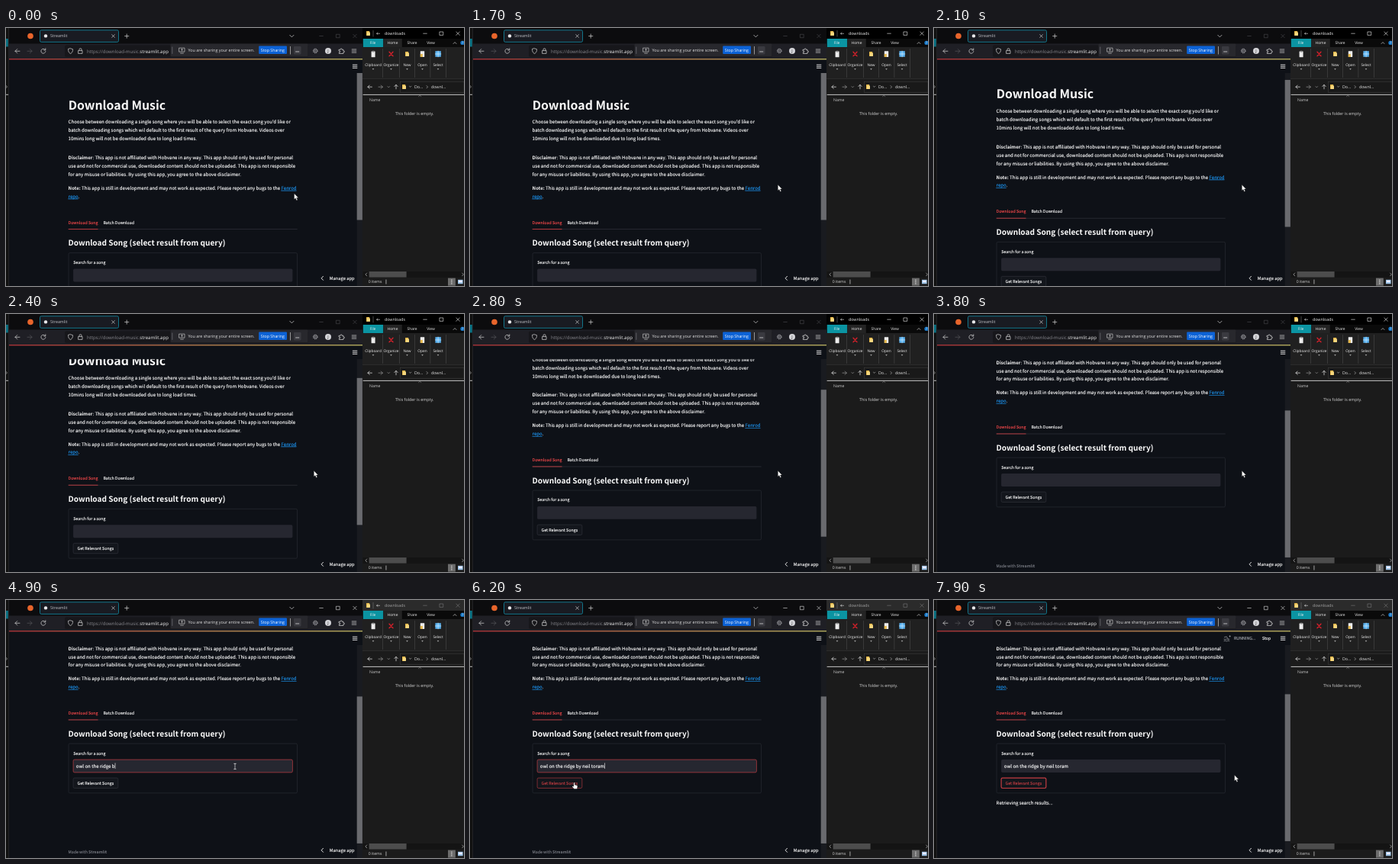
Animation of 600 by 338 pixels, one loop 8 s. Source, as an HTML page:

```html
<!DOCTYPE html>
<html lang="en">
<head>
<meta charset="utf-8">
<title>Download Music</title>
<style>
  html, body { margin: 0; width: 100%; height: 100%; overflow: hidden; background: #0c0c0e; }
  svg { display: block; width: 100vw; height: 100vh; }
  text { white-space: pre; text-rendering: geometricPrecision; }
  .app { --ink: #fafafa; font-family: "Noto Sans CJK JP", "Noto Sans CJK SC", "Noto Sans CJK", Lato, sans-serif; }
  .app, .app tspan { fill: var(--ink); stroke: var(--ink); stroke-width: .14; }
  .ui { font-family: "Open Sans", "Noto Sans", sans-serif; }
  .app.b, .app .b { font-weight: 700; stroke-width: 0; }
  .link { --ink: #1c8fe8; text-decoration: underline; }
  .line { fill: none; stroke-linecap: round; stroke-linejoin: round; }
</style>
</head>
<body>
<svg id="stage" viewBox="0 0 600 338" preserveAspectRatio="none"></svg>
<script>
const LOOP = 8000;
const RED = '#f4494b', RED_EDGE = '#c23d42';
const SONG = 'owl on the ridge by neil toram';

const text = (x, y, size, str, cls = 'app', extra = '') =>
  `<text x="${x}" y="${y}" font-size="${size}" class="${cls}" ${extra}>${str}</text>`;
const ui = (x, y, size, str, fill = '#e4e4e4', extra = '') =>
  text(x, y, size, str, 'ui', `fill="${fill}" ${extra}`);
const mid = (x, y, size, str, fill) => ui(x, y, size, str, fill, 'text-anchor="middle"');
const rect = (x, y, w, h, fill, extra = '') =>
  `<rect x="${x}" y="${y}" width="${w}" height="${h}" fill="${fill}" ${extra}/>`;
const path = (d, stroke = '#d8d8d8', w = 0.7, extra = '') =>
  `<path class="line" d="${d}" stroke="${stroke}" stroke-width="${w}" ${extra}/>`;
const dot = (x, y, r, fill, extra = '') =>
  `<circle cx="${x}" cy="${y}" r="${r}" fill="${fill}" ${extra}/>`;
const ink = color => `style="--ink:${color}"`;
const bold = s => `<tspan class="b">${s}</tspan>`;
const link = s => `<tspan class="link">${s}</tspan>`;
const winButtons = (xs, y) => path(
  `M${xs[0] - 2.3} ${y}h4.6M${xs[1] - 2.2} ${y - 2.2}h4.4v4.4h-4.4z` +
  `M${xs[2] - 2.2} ${y - 2.2}l4.4 4.4m0-4.4l-4.4 4.4`, 'currentColor', 0.6);

function leftEdge() {
  return rect(0, 0, 4, 338, '#111') + rect(0, 14, 2.8, 10.5, '#0b7284') +
    rect(0, 86.8, 3, 0.9, '#cfcfcf') + path('M0 75.5l1.6 1.5l-1.6 1.5', '#ccc', 0.6) +
    rect(3, 0, 0.8, 338, '#29292c');
}

function browserChrome() {
  return rect(3.8, 0, 463.2, 21, '#0c0c0e') + rect(3.8, 20.5, 463.2, 20, '#1f1f25') +
    dot(32, 10.5, 3.8, '#e8652b') +
    rect(44.5, 2.8, 103, 15.6, '#191b22', 'rx="1.8" stroke="#148198" stroke-width=".9"') +
    dot(52, 10.4, 2.2, '#e8e8ea') + ui(58, 12.4, 5.35, 'Streamlit', '#c4c5ca') +
    path('M138.7 8.7l3.6 3.6m0-3.6l-3.6 3.6M158.2 8v5.2m-2.6-2.6h5.2M371.8 9.3l2.6 2.6l2.6-2.6') +
    `<g id="webButtons">${winButtons([413, 435, 457], 10.5)}</g>` +
    path('M18 30.3h-6m2.7-2.7l-2.7 2.7l2.7 2.7') +
    path('M28 30.3h6m-2.7-2.7l2.7 2.7l-2.7 2.7', '#55555b') +
    path('M51.4 28.6a3 3 0 1 0 .5 2M51.8 26.8v2.2h-2.2') +
    rect(77, 22.5, 319, 15.5, '#17171b', 'rx="2"') +
    path('M84.5 26.8l3 1c0 3-.8 4.6-3 5.8c-2.2-1.2-3-2.8-3-5.8z') +
    path('M95 29.6h5v3.8h-5zM96 29.4v-1.2a1.5 1.5 0 0 1 3 0v1.2') +
    ui(106, 32.7, 6.1, 'https://download-music.<tspan fill="#f2f2f2">streamlit.app</tspan>', '#8b8b91') +
    rect(215.5, 20.8, 180, 16.4, '#28282d', 'rx="1"') +
    path('M217.8 25v8.5', '#66666b', 0.9) +
    path('M227 26.2h7v5h-7zM228.6 33.2h3.8M230.5 30v-2.4m-1 .9l1-1l1 1', '#d8d8d8', 0.6) +
    ui(238.5, 30.9, 5.38, 'You are sharing your entire screen.') +
    rect(331.2, 23.4, 36.8, 10.7, '#0c62d6', 'rx="1"') +
    ui(333.8, 30.8, 5.25, 'Stop Sharing', '#fff') +
    rect(372, 24, 0.7, 10.5, '#c8c8c8') + rect(377, 24, 9.5, 10.5, '#3a3a40', 'rx="1"') +
    path('M379.6 31h4.2', '#eee') +
    dot(405.3, 30, 2.9, 'none', 'stroke="#a8a8ac" stroke-width="1" stroke-dasharray="1.2 1.08"') +
    dot(405.3, 30, 2.2, 'none', 'stroke="#b8b8bc" stroke-width=".6"') +
    dot(405.3, 30, 0.9, 'none', 'stroke="#b8b8bc" stroke-width=".5"') +
    dot(422, 30, 4, '#d4d4d8') + mid(422, 32, 5.2, 'J', '#222') +
    path('M436.4 28.3h1.8a1 1 0 1 1 1.9 0h1.8v1.7a1 1 0 1 1 0 1.8v1.7h-5.5v-1.7a1 1 0 1 0 0-1.8z') +
    path('M453.2 28h5.6m-5.6 2.1h5.6m-5.6 2.1h5.6');
}

function pageContent() {
  const body = [
    [125.4, 'Choose between downloading a single song where you will be able to select the exact song you\'d like or'],
    [136.4, 'batch downloading songs which wil default to the first result of the query from Hobvane. Videos over'],
    [147.3, '10mins long will not be downloaded due to long load times.'],
    [172, bold('Disclaimer') + ': This app is not affiliated with Hobvane in any way. This app should only be used for personal'],
    [183, 'use and not for commercial use, downloaded content should not be uploaded. This app is not responsible'],
    [193.9, 'for any misuse or liabilities. By using this app, you agree to the above disclaimer.'],
    [211.8, bold('Note:') + ' This app is still in development and may not work as expected. Please report any bugs to the ' + link('Fenrod')],
    [222.6, link('repo') + '.']
  ];
  return text(81.7, 106.6, 15.85, 'Download Music', 'app b') +
    body.map(([y, s]) => text(81.6, y, 6.08, s)).join('') +
    text(81.5, 256.6, 5.3, 'Download Song', 'app', ink(RED)) +
    text(127.4, 256.6, 5.3, 'Batch Download') +
    rect(81.7, 263.1, 300, 0.8, '#2b2e36') + rect(81.7, 263, 38.8, 0.9, RED_EDGE) +
    text(81.6, 285.3, 10.08, 'Download Song (select result from query)', 'app b') +
    rect(82, 294.6, 299.5, 64.8, 'none', 'rx="1.7" stroke="#2c2f37" stroke-width=".6"') +
    text(88.2, 309, 5.3, 'Search for a song') +
    rect(88.1, 315.6, 287.3, 16.8, '#262730', 'id="input" rx="1.7" stroke-width=".7"') +
    text(91.8, 326.2, 6.08, '<tspan id="typed"></tspan>') +
    rect(0, 320, 0.6, 7.6, '#fafafa', 'id="caret"') +
    rect(88.1, 339.6, 58.7, 13.4, '#13161c', 'id="button" rx="1.7"') +
    text(93.6, 348.2, 5.3, 'Get Relevant Songs', 'app', 'id="label"') +
    text(81.6, 374.2, 6.08, 'Retrieving search results...', 'app', 'id="status"') +
    text(81.5, 438.3, 5.25, 'Made with ' + bold('Streamlit'), 'app', `id="footer" ${ink('#767980')}`);
}

function page() {
  return rect(3.8, 40, 463.2, 298, '#0e1117') +
    `<g clip-path="url(#view)"><g id="content">${pageContent()}</g></g>` +
    rect(459.7, 59, 7.3, 279, '#191b20') + rect(459.7, 59, 7.2, 192.5, '#696a6e', 'id="thumb"') +
    rect(3.8, 40.3, 463.2, 1.1, 'url(#rainbow)') +
    path('M454.3 48.2h5.6m-5.6 2.1h5.6m-5.6 2.1h5.6', '#e8e8e8', 0.9) +
    path('M415.5 325.3l-2.4 2.5l2.4 2.5', '#fafafa', 0.9) + text(423.7, 330, 5.8, 'Manage app') +
    `<g id="running">${path('', '#a5a8ae', 0.7, 'id="runner"')}${dot(387.6, 47.5, 0.9, '#a5a8ae')}` +
    text(393, 52.4, 5.3, 'RUNNING...', 'app', ink('#a5a8ae')) + text(430, 52.4, 5.2, 'Stop') + '</g>';
}

function folderIcon(x, y) {
  return rect(x, y, 4.2, 6, '#e5b84b', 'rx=".5"') + rect(x + 1, y + 1.6, 4, 4.4, '#f6d880', 'rx=".4"');
}

function explorer() {
  const tools = [[481, 'Clipboard'], [504.5, 'Organize'], [525.5, 'New'], [545.5, 'Open'], [566, 'Select']];
  const tabs = [[480.5, 'File'], [506.5, 'Home'], [532, 'Share'], [556.5, 'View']];
  return rect(467, 0, 133, 338, '#1b1b1b') + rect(467, 0, 133, 14, '#000', 'id="folderTitle"') +
    folderIcon(472, 4) + path('M481 3.5v7.5', '#777', 0.6) +
    path('M489.6 7.3h-4m1.4-1.2l-1.4 1.2l1.4 1.2', '#ddd', 0.6) +
    ui(496, 9.3, 5.3, 'downloads', 'currentColor', 'id="folderName"') +
    `<g id="folderButtons">${winButtons([549, 570.5, 592], 7.2)}</g>` +
    rect(467, 14, 133, 11, '#0a0a0a') + rect(467.8, 14, 26.5, 11, '#0b94a2') + rect(494.3, 14, 24.5, 11, '#242424') +
    tabs.map(([x, s]) => mid(x, 21.3, 4.9, s, '#f0f0f0')).join('') +
    path('M586 20.6l2-2l2 2', '#ccc') + dot(598, 19.4, 2.7, '#1677c8') + mid(598, 21.2, 4.6, '?', '#fff') +
    rect(467, 25, 133, 41.5, '#202020') + rect(467, 66.2, 133, 0.7, '#333') +
    [493.2, 515.3, 535.2, 555.6, 576].map(x => rect(x, 27, 0.6, 38, '#4a4a4a')).join('') +
    tools.map(([x, s]) => mid(x, 49.7, 4.8, s, '#f0f0f0') +
      `<path d="M${x - 1.3} 53.2h2.6l-1.3 1.5z" fill="#ccc"/>`).join('') +
    rect(478.6, 30.6, 5, 7.6, '#ececec', 'rx=".5"') + rect(479.8, 29.8, 2.6, 1.8, '#888') +
    path('M502 31.2l5 5.6m0-5.6l-5 5.6', '#d6202a', 1.3) +
    folderIcon(523, 31) + rect(542.8, 30.2, 5.4, 7.8, '#ececec', 'rx=".4"') + rect(542.8, 34, 3, 4, '#e5b84b') +
    rect(562.4, 30.2, 7.4, 7.6, '#5ab2f0') + path('M566.1 30.2v7.6m-3.7-3.8h7.4', '#d7eefc', 0.7) +
    path('M479.4 77.2h-5.4m2.2-2.2l-2.2 2.2l2.2 2.2M511 79.8v-5.4m-2.2 2.2l2.2-2.2l2.2 2.2', '#eee') +
    path('M488 77.2h5.4m-2.2-2.2l2.2 2.2l-2.2 2.2M500 76.6l1.3 1.3l1.3-1.3', '#9a9a9a') +
    rect(516.5, 70.2, 83.5, 14, '#191919', 'stroke="#444" stroke-width=".5"') + folderIcon(519, 74) +
    path('M528.4 76.2l1.2 1.2l1.2-1.2M551 75.6l1.6 1.6l-1.6 1.6', '#ccc', 0.6) +
    ui(535, 79.2, 5.3, 'Do...') + ui(557, 79.2, 5.3, 'downl...') +
    rect(467.6, 86.9, 132.4, 0.9, '#d6d6d6') + path('M540.6 89.6l1.6-1.3l1.6 1.3', '#aaa', 0.5) +
    ui(476, 96.4, 5.2, 'Name', '#c8c8c8') + ui(510, 114, 5.38, 'This folder is empty.', '#d8d8d8') +
    rect(467.6, 319, 132.4, 7.8, '#141414') + rect(475.6, 319, 49, 7.6, '#4d4d4d') +
    path('M472.7 321l-1.8 1.9l1.8 1.9M597.6 321l1.8 1.9l-1.8 1.9', '#bbb') +
    ui(474.7, 334.4, 5.2, '0 items', '#d8d8d8') + rect(497.6, 329.5, 0.7, 6, '#ddd') +
    rect(579, 327.6, 9.8, 10, '#6c6c6c') + path('M583.4 330.3h.8m-.8 2.3h.8m-.8 2.3h.8', '#eee', 0.9) +
    rect(592, 329.8, 6.6, 5.4, '#9cc3e6') + rect(593, 330.7, 4.6, 2.4, '#eef');
}

const stage = document.getElementById('stage');
stage.innerHTML =
  `<defs><clipPath id="view"><rect x="3.8" y="59.3" width="455.4" height="279"/></clipPath>
  <linearGradient id="rainbow"><stop offset="0" stop-color="#d53c42"/><stop offset=".5" stop-color="#e0935a"/>
  <stop offset="1" stop-color="#e2d873"/></linearGradient></defs>` +
  browserChrome() + page() + leftEdge() + explorer() +
  `<g id="pointer">
    <path id="arrow" d="M0 0v7.8l1.8-1.6l1.3 2.9l1.4-.6l-1.3-2.8h2.4z" fill="#fff" stroke="#111" stroke-width=".4"/>
    <path id="hand" d="M-.8 .4q.8-.9 1.5 0v2.7l3 .8q.8.3.6 1.3l-.6 3.3h-4l-2.4-3.1q.3-1.3 1.9-.2z" fill="#fff" stroke="#111" stroke-width=".4"/>
    <path id="beam" class="line" d="M-1.3-3.6h2.6m-1.3 0v7.2m-1.3 0h2.6" stroke="#fff" stroke-width=".6"/>
  </g>`;

const el = Object.fromEntries([...stage.querySelectorAll('[id]')].map(n => [n.id, n]));
const show = (node, on) => node.setAttribute('visibility', on ? 'visible' : 'hidden');
const smooth = p => p * p * (3 - 2 * p);

// Keys are [time, value, value...]; values hold before the first and after the last.
function at(keys, t, ease = p => p) {
  const i = keys.findIndex(k => k[0] > t);
  if (i === 0) return keys[0].slice(1);
  if (i < 0) return keys[keys.length - 1].slice(1);
  const a = keys[i - 1], b = keys[i], p = ease((t - a[0]) / (b[0] - a[0]));
  return a.slice(1).map((v, n) => v + (b[n + 1] - v) * p);
}

const scrollKeys = [[1930, 0], [2400, 39.2], [3000, 75.6], [3700, 106.5]];
const typeKeys = [[4550, 0], [5000, 24], [5250, 24], [5420, 30]];
const pointerKeys = [
  [100, 377.5, 216.8], [900, 379, 218], [1650, 403.3, 205.3], [4150, 403.3, 205.3],
  [4450, 300, 218], [5650, 300, 218], [6150, 136.6, 239], [6600, 136.6, 239],
  [7350, 200, 268], [7850, 393.6, 229.3]
];

function render(t) {
  const focused = t >= 4450, sent = t >= 6550, running = t >= 6700, waiting = t >= 7000;
  const [scroll] = at(scrollKeys, t);
  const [x, y] = at(pointerKeys, t, smooth);
  const over = (x0, y0, x1, y1) => x > x0 && x < x1 && y > y0 && y < y1;
  const overButton = focused && over(88, 233, 147, 247);
  const overInput = focused && over(88, 209, 375.5, 226);

  el.content.setAttribute('transform', `translate(0 ${-scroll})`);
  el.thumb.setAttribute('y', 59 + scroll * 0.633 - (waiting ? 3 : 0));

  el.webButtons.style.color = focused ? '#e4e4e4' : '#4a4a50';
  el.folderButtons.style.color = focused ? '#77777a' : '#f0f0f0';
  el.folderName.style.fill = focused ? '#a4a4a4' : '#f4f4f4';
  el.folderTitle.setAttribute('fill', focused ? '#2b2b2b' : '#000');

  el.typed.textContent = SONG.slice(0, Math.floor(at(typeKeys, t)[0]));
  const typing = focused && !sent;
  el.input.setAttribute('stroke', typing ? RED_EDGE : 'none');
  show(el.caret, typing);
  if (typing) el.caret.setAttribute('x', 92 + (el.typed.textContent ? el.typed.getComputedTextLength() : 0));

  const hot = overButton || sent;
  el.button.setAttribute('stroke', hot ? RED_EDGE : '#34373e');
  el.button.setAttribute('stroke-width', sent ? 1.2 : 0.6);
  el.label.style.setProperty('--ink', hot ? RED_EDGE : '#fafafa');

  show(el.running, running);
  const sway = Math.floor(t / 200) % 2 ? 0.7 : -0.7;
  el.runner.setAttribute('d',
    `M380.5 ${48.4 + sway / 2}l2.7-.8l2.2 3M380 51.4q1.2 ${sway} 2.3 0t2.3 0t2.3 0M380 53.6q1.2 ${-sway} 2.3 0t2.3 0t2.3 0`);
  show(el.status, waiting);
  show(el.footer, !waiting);

  el.pointer.setAttribute('transform', `translate(${x} ${y})`);
  show(el.hand, overButton);
  show(el.beam, overInput);
  show(el.arrow, !overButton && !overInput);
}

function tick() {
  render(performance.now() % LOOP);
  requestAnimationFrame(tick);
}
tick();
</script>
</body>
</html>
```
